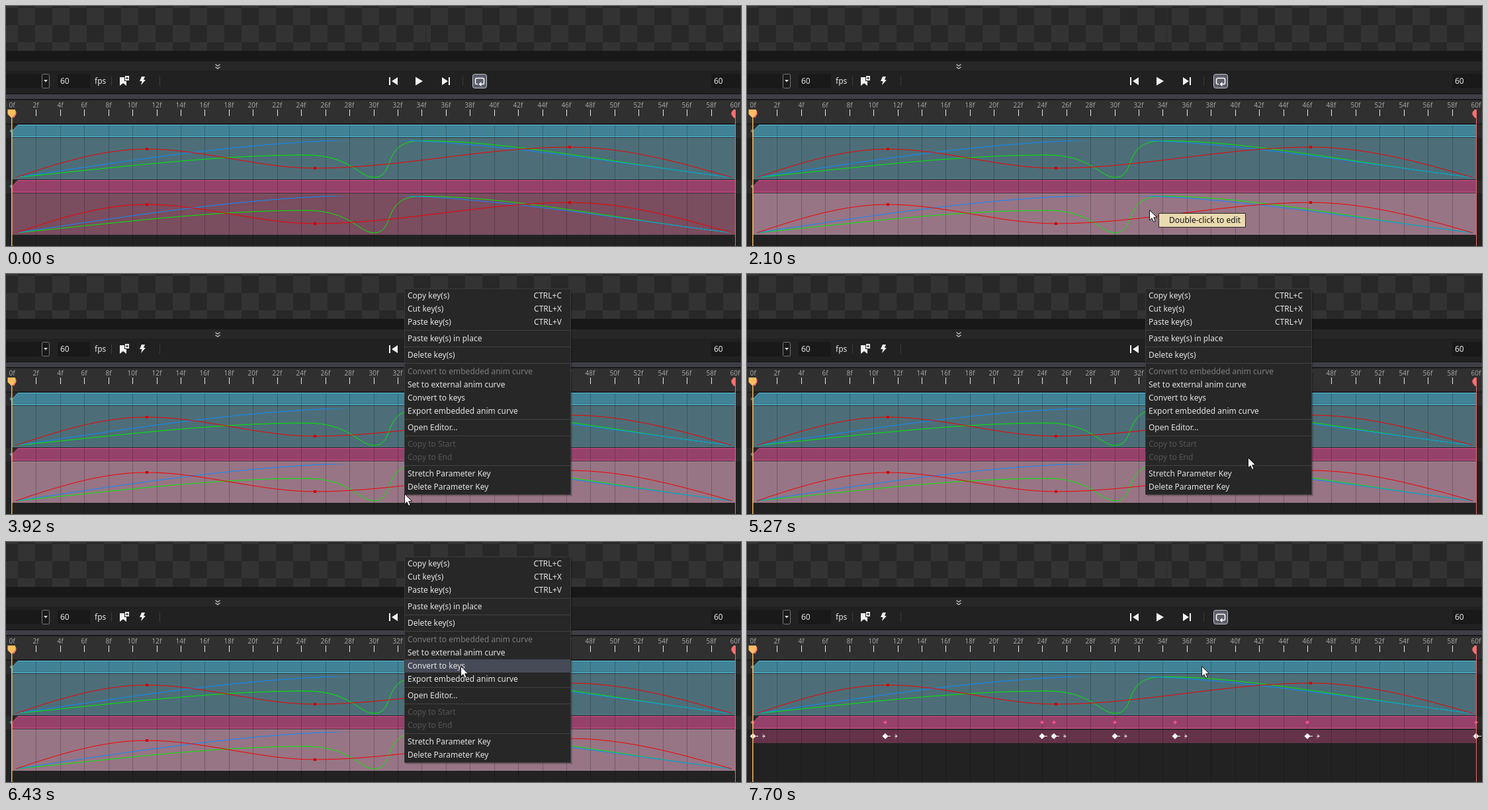
An HTML page with a canvas for the animation above (8000 ms loop, 1111 px wide and 364 px high).

```html
<!DOCTYPE html>
<html lang="en">
<head>
<meta charset="utf-8">
<title>Timeline curve to keys</title>
<style>
html, body { margin: 0; width: 100%; height: 100%; overflow: hidden; background: #212121; }
canvas { display: block; }
</style>
</head>
<body>
<canvas id="stage" width="1111" height="364"></canvas>
<script>
const W = 1111, H = 364, LOOP = 8000;
const c = document.getElementById('stage').getContext('2d');
const frameX = f => 9 + f * 18.217;

function rect(x, y, w, h, fill) {
  c.fillStyle = fill;
  c.fillRect(x, y, w, h);
}

function shape(d, fill, stroke, x = 0, y = 0, width = 1) {
  const p = new Path2D(d);
  c.save();
  c.translate(x, y);
  if (fill) { c.fillStyle = fill; c.fill(p); }
  if (stroke) { c.strokeStyle = stroke; c.lineWidth = width; c.stroke(p); }
  c.restore();
}

function box(x, y, w, h, r, fill, stroke) {
  c.beginPath();
  c.roundRect(x + .5, y + .5, w - 1, h - 1, r);
  c.fillStyle = fill;
  c.fill();
  c.strokeStyle = stroke;
  c.lineWidth = 1;
  c.stroke();
}

function text(s, x, y, fill = '#e4e4e4', align = 'left', size = 12) {
  c.font = size + 'px "Noto Sans", "Open Sans", sans-serif';
  c.textAlign = align;
  c.fillStyle = fill;
  c.fillText(s, x, y);
}

function diamond(x, y, r, fill) {
  shape(`M${-r} 0L0 ${-r}L${r} 0L0 ${r}Z`, fill, null, x, y);
}

function viewport() {
  for (let row = 0; row < 4; row++)
    for (let col = 0; col < 44; col++)
      rect(col * 26 - 8, row * 26 - 23, 26, 26, (row + col) % 2 ? '#282828' : '#333333');
  rect(634, 0, 1, 68, '#292b30');
  rect(0, 68, W, 16, '#181818');
  rect(0, 84, W, 14, '#272727');
  shape('M316.5 88.5l3.5 2.5l3.5-2.5M316.5 92.5l3.5 2.5l3.5-2.5', null, '#cccccc', 0, 0, 1.2);
}

function toolbar() {
  rect(0, 98, W, 35, '#212121');
  for (const [x, w] of [[0, 53], [78, 49], [1066, 45]]) rect(x, 103, w, 22, '#191919');
  box(54, 103, 12, 22, 2, '#191919', '#777777');
  shape('M57 112h6l-3 3.5z', '#dddddd');
  text('60', 82, 118);
  text('fps', 134, 118);
  text('60', 1070, 118);
  for (const x of [159, 232, 690]) rect(x, 107, 1, 14, '#3c3c3c');
  // bookmark with plus, lightning
  shape('M172 108h7v6h3v7l-5-4l-5 4z', '#f0f0f0');
  shape('M180 106h6v7h-6z', '#f0f0f0');
  shape('M183 107.5v4M181 109.5h4', null, '#212121');
  shape('M205 107h5l-2 5h3l-7 8l1.5-6h-3.5z', '#f0f0f0');
  // transport
  shape('M579 108h2v12h-2zM592 108v12l-9-6z', '#f2f2f2');
  shape('M619 107.5v13l11-6.5z', '#f2f2f2');
  shape('M659 108v12l9-6zM669 108h2v12h-2z', '#f2f2f2');
  box(705, 103, 22, 22, 3, '#5b5d69', '#c4c5d0');
  shape('M713 118.5h-1.5q-2 0-2-2v-5q0-2 2-2h9q2 0 2 2v5q0 2-2 2h-2.5', null, '#ffffff', 0, 0, 1.5);
  shape('M718.5 115v7l-4-3.5z', '#ffffff');
  rect(0, 132, W, 2, '#1a1a1a');
  rect(0, 134, W, 7, '#3e3e46');
  rect(0, 141, W, 2, '#191919');
}

function ruler() {
  rect(0, 143, W, 35, '#303030');
  rect(0, 178, W, 2, '#1d1d1d');
  for (let f = 0; f <= 60; f += 2) {
    const x = Math.round(frameX(f));
    text(f + 'f', x, 154, '#a2a2a2', 'center', 10);
    rect(x, 157, 1, 10, '#e8e8e8');
  }
}

function header(y, fill, edge) {
  rect(0, y, W, 20, '#2b2b2b');
  diamond(8, y + 9.5, 3, '#5c7a70');
  shape('M18 .5H1102.5V18.5H9.5V9.5Z', fill, edge, 0, y);
}

function curves(y) {
  c.save();
  c.beginPath();
  c.rect(9, y + 4, 1094, 60);
  c.clip();
  const line = (d, color) => shape(d, null, color, 0, y - 200);
  line('M15 260C160 246 310 226 454 226C520 226 534 260 556 260C590 260 566 204 628 204.5C760 204 930 240 1097 260', '#00f000');
  line('M15 260C190 234 380 203 556 203C720 203 920 238 1097 260', '#0c8cff');
  line('M15 260C80 238 146 217 213 217C298 217 382 246 467 246C595 246 724 214 852 214C934 214 1015 236 1097 260', '#f50000');
  c.restore();
  for (const [x, dy] of [[213, 17], [467, 46], [852, 14]]) rect(x - 2, y + dy - 2, 4, 4, '#cc0000');
  rect(453, y + 25, 2, 2, '#00d000');
}

function keys() {
  for (const f of [0, 11, 24, 25, 30, 35, 46, 60]) {
    const x = Math.round(frameX(f));
    diamond(x, 273.5, 3, '#f0508f');
    diamond(x, 294.5, 4.5, '#ffffff');
    shape('M4 .5h4M14 .5h4M15 -2.5l3 3l-3 3', null, '#f4f4f4', x, 294);
  }
}

function tracks(selected, converted) {
  rect(0, 180, W, 184, '#222222');
  header(180, '#418296', '#52bfdd');
  rect(9, 200, 1093, 63, '#4d6e78');
  header(264, '#964169', '#df4d93');
  if (converted) rect(9, 285, 1093, 20, '#653349');
  else rect(9, 284, 1093, 63, selected ? '#977585' : '#7a4d5f');
  for (let f = 2; f < 60; f += 2) rect(Math.round(frameX(f)), 181, 1, 183, 'rgba(0,0,0,.22)');
  curves(200);
  if (converted) keys();
  else curves(284);
  // playhead and range ends
  shape('M7 157h6l2.5 3v4l-3.5 6l-5-5z', '#ff6f6f');
  shape('M1103 157h-3l-3.5 4v4l4 5h2.5z', '#ff6f6f');
  rect(1102, 157, 1, 207, '#f06a68');
  shape('M2.5 157h11.5v7l-4.5 5h-2l-5-5z', '#ffbe60');
  rect(8, 168, 1.5, 196, '#f5b65c');
}

// label centre, caption, shortcut or disabled colour
const items = [
  [33, 'Copy key(s)', 'CTRL+C'], [53, 'Cut key(s)', 'CTRL+X'], [73, 'Paste key(s)', 'CTRL+V'],
  [98, 'Paste key(s) in place'], [123, 'Delete key(s)'],
  [148, 'Convert to embedded anim curve', '', '#7c7c7c'], [168, 'Set to external anim curve'],
  [188, 'Convert to keys'], [208, 'Export embedded anim curve'], [233, 'Open Editor...'],
  [258, 'Copy to Start', '', '#555555'], [278, 'Copy to End', '', '#555555'],
  [303, 'Stretch Parameter Key'], [323, 'Delete Parameter Key']
];

function menu(pointer) {
  rect(604, 24, 252, 313, 'rgba(0,0,0,.2)');
  box(602, 22, 252, 313, 0, '#272727', '#3a3a3a');
  for (const y of [85, 110, 135, 220, 245, 290]) rect(603, y, 250, 1, '#424242');
  for (const [y, label, shortcut, dim] of items) {
    if (!dim && pointer.x > 602 && pointer.y >= y - 10 && pointer.y < y + 10) rect(603, y - 10, 250, 20, '#464a57');
    text(label, 607, y + 4, dim);
    if (shortcut) text(shortcut, 840, y + 4, undefined, 'right');
  }
}

function tooltip() {
  box(622, 314, 132, 22, 0, '#e9dab0', '#282621');
  text('Double-click to edit', 638, 329, '#111111');
}

// pointer moves: start, end, number of steps, destination
const moves = [
  [1220, 1730, 7, 608, 309], [2570, 2570, 1, 607, 309], [3280, 3460, 3, 602, 333],
  [4820, 5270, 6, 757, 278], [5360, 5620, 4, 717, 224], [5710, 6430, 9, 687, 188]
];

function pointerAt(t) {
  let x = 608, y = 370;
  for (const [start, end, n, toX, toY] of moves) {
    if (t < start) break;
    const step = n > 1 ? Math.floor((t - start) * (n - 1) / (end - start) + .001) + 1 : 1;
    const k = Math.min(1, step / n);
    x += (toX - x) * k;
    y += (toY - y) * k;
  }
  return { x: Math.round(x), y: Math.round(y) };
}

function draw(t) {
  const pointer = pointerAt(t);
  viewport();
  toolbar();
  ruler();
  tracks(t >= 2100, t >= 7700);
  if (t >= 2100 && t < 3920) tooltip();
  if (t >= 3920 && t < 7610) menu(pointer);
  shape('M.5 .5V16L4 12.8L6.6 18.5L9.2 17.4L6.7 11.8H11.8Z', '#ffffff', '#111111', pointer.x, pointer.y);
}

const begin = performance.now();
function tick() {
  draw((performance.now() - begin) % LOOP);
  requestAnimationFrame(tick);
}
tick();
</script>
</body>
</html>
```
